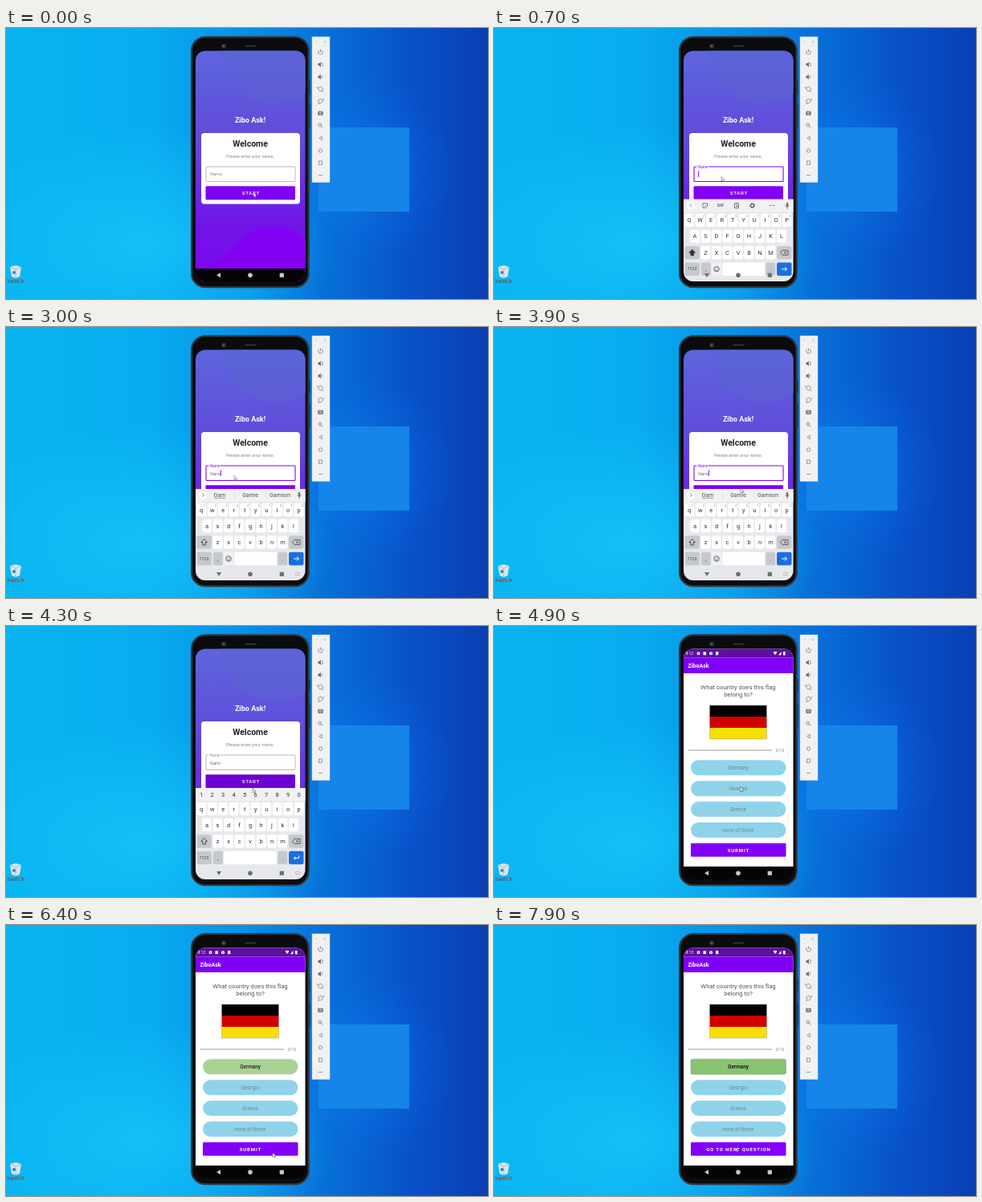
An HTML page for the animation above (8000 ms loop, 600x338 px).

```html
<!DOCTYPE html>
<html lang="en">
<head>
<meta charset="utf-8">
<title>Quiz on a phone emulator</title>
<style>
html, body { margin: 0; width: 100%; height: 100%; overflow: hidden; background: #0a7fe0; }
svg { display: block; width: 100vw; height: 100vh; font-family: Roboto, "Open Sans", sans-serif; }
</style>
</head>
<body>
<svg viewBox="0 0 600 338">
  <defs>
    <linearGradient id="sky" x2="1">
      <stop stop-color="#08b4f0"/><stop offset=".3" stop-color="#08acf0"/>
      <stop offset=".5" stop-color="#0890e6"/><stop offset=".66" stop-color="#0770d8"/>
      <stop offset=".85" stop-color="#0850c8"/><stop offset="1" stop-color="#0a3fb4"/>
    </linearGradient>
    <radialGradient id="beam">
      <stop stop-color="#14c2f8" stop-opacity=".9"/><stop offset="1" stop-color="#14c2f8" stop-opacity="0"/>
    </radialGradient>
    <radialGradient id="glow">
      <stop stop-color="#1080f0" stop-opacity=".7"/><stop offset="1" stop-color="#0a68e4" stop-opacity="0"/>
    </radialGradient>
    <linearGradient id="page" x2="0" y2="1">
      <stop stop-color="#5d66de"/><stop offset=".4" stop-color="#6149da"/>
      <stop offset=".75" stop-color="#7016e6"/><stop offset="1" stop-color="#8004f2"/>
    </linearGradient>
    <linearGradient id="disc" x2="0" y2="1">
      <stop offset=".4" stop-color="#5a66d8"/><stop offset="1" stop-color="#5e5cd6"/>
    </linearGradient>
    <clipPath id="screen"><rect x="236" y="28.500" width="136.500" height="287.500" rx="12"/></clipPath>
  </defs>
  <rect width="600" height="338" fill="url(#sky)"/>
  <ellipse cx="170" cy="270" rx="240" ry="150" fill="url(#beam)"/>
  <ellipse cx="430" cy="178" rx="130" ry="125" fill="url(#glow)"/>
  <rect x="389" y="124" width="113" height="105" fill="#1585ea"/>
  <g id="bin">
    <path d="M5 298L12 296 19 298 17 310 12 312 7 310Z" fill="#dce5ea"/>
    <path d="M5 298L12 301 19 298M12 301V312" fill="none" stroke="#9aabb5" stroke-width=".7"/>
    <circle cx="10" cy="305" r="2" fill="#3585c6"/>
    <text x="12" y="317" font-size="4.300" fill="#fff" stroke="#123" stroke-width=".7" paint-order="stroke" text-anchor="middle">Recycle Bin</text>
  </g>
  <g id="phone">
    <path d="M377.500 66V82M377.500 96V126" stroke="#333" stroke-width="2"/>
    <rect x="230" y="10.300" width="147.700" height="314" rx="18" fill="#2e2e32"/>
    <rect x="231.600" y="11.800" width="144.500" height="311" rx="16.500" fill="#0c0c0e" stroke="#56565c" stroke-width=".6"/>
    <circle cx="271" cy="22.500" r="3" fill="#292d35"/><circle cx="271" cy="22.500" r="1.200" fill="#526174"/>
    <path d="M298 22.500H311" stroke="#3a3a3e" stroke-width="1.600" stroke-linecap="round"/>
  </g>
  <g id="live" clip-path="url(#screen)"></g>
  <g id="tools" fill="none" stroke="#6c7276" stroke-width=".8">
    <rect x="381" y="11" width="22" height="181.500" fill="#f1f1f1" stroke="#d2d5d7" stroke-width=".5"/>
    <path d="M385.500 17H388M395.500 15.800L398 18.200M398 15.800L395.500 18.200" stroke="#aaa" stroke-width=".6"/>
    <path d="M389.500 28.200A2.800 2.800 0 1 0 393.500 28.200M391.500 26.500V30"/>
    <path d="M388.500 44H390L392 42.300V48.700L390 47H388.500ZM388.500 59.500H390L392 57.800V64.200L390 62.500H388.500Z" fill="#6c7276" stroke="none"/>
    <path d="M393.300 43Q395.300 45.500 393.300 48M393.300 59.500Q394.300 61 393.300 62.500"/>
    <path d="M388.300 76L391.500 72.800 394.700 76 391.500 79.200ZM388.300 91L391.500 87.800 394.700 91 391.500 94.200Z"/>
    <path d="M393 79H395.200M387.800 73V75M388 94.200H390.200M395.200 88V90"/>
    <rect x="388.700" y="104.200" width="5.600" height="4.200" rx=".5" fill="#6c7276"/><circle cx="391.500" cy="106.300" r="1.200" stroke="#fff" stroke-width=".7"/>
    <circle cx="390.800" cy="121" r="1.900"/><path d="M392.200 122.400L394.200 124.700"/>
    <path d="M393.300 135.200L389.700 137.500 393.300 139.800Z" stroke-width=".7"/>
    <circle cx="391.500" cy="153" r="2.200" stroke-width=".7"/>
    <rect x="389.400" y="166" width="4.200" height="4.200" stroke-width=".7"/>
    <path d="M389 183.500H394" stroke-width="1.200" stroke-dasharray="1.200 .7"/>
  </g>
  <path id="mouse" d="M0 0V5.600L1.400 4.500 2.300 6.500 3.300 6 2.400 4.100H4.100Z" fill="#fff" stroke="#444" stroke-width=".5"/>
</svg>
<script>
const LOOP = 8000, PURPLE = '#8000f7';
const $ = id => document.getElementById(id);
const clamp = x => Math.min(1, Math.max(0, x));
const part = (t, from, to) => clamp((t - from) / (to - from));
const easeOut = x => 1 - (1 - x) ** 3;
const smooth = x => x * x * (3 - 2 * x);

const box = (x, y, w, h, fill, r = 0, more = '') =>
  `<rect x="${x}" y="${y}" width="${w}" height="${h}" rx="${r}" fill="${fill}" ${more}/>`;
const line = (d, color, w = .8) => `<path d="${d}" fill="none" stroke="${color}" stroke-width="${w}"/>`;
const shape = (d, color) => `<path d="${d}" fill="${color}"/>`;
const dot = (x, y, r, fill, more = '') => `<circle cx="${x}" cy="${y}" r="${r}" fill="${fill}" ${more}/>`;
const text = (x, y, size, s, fill, weight = 400, anchor = 'middle', gap = 0) =>
  `<text x="${x + (anchor == 'middle' ? gap / 2 : 0)}" y="${y}" font-size="${size}" fill="${fill}" font-weight="${weight}" text-anchor="${anchor}" letter-spacing="${gap}">${s}</text>`;
const move = (y, s, opacity = 1) => `<g transform="translate(0 ${y})" opacity="${opacity}">${s}</g>`;

// Typed text and suggestions from each moment on
const typing = [
  [0, ''],
  [1600, 'G', 'G', 'Good', 'Great'],
  [1900, 'Ga', 'Ga', 'Game', 'Gave'],
  [2400, 'Gar', 'Gar', 'Garden', 'Garlic'],
  [2600, 'Garn', 'Garn', 'Garnie', 'Garnson']
];
const typedAt = t => typing.filter(s => s[0] <= t).pop();

const FOCUS = 520, CLICK = 4120, OPEN = 4470, PICK = 5750, SUBMIT = 6650, MINUTE = 7000;

function home(t) {
  const word = typedAt(t)[1];
  const focus = t >= FOCUS && t < CLICK;
  const lift = smooth(part(t, FOCUS, FOCUS + 150));
  const tint = focus ? PURPLE : '#8c8c8c';
  const labelSize = 5.6 - 1.1 * lift;
  const caretX = 254.7 + word.length * 3.15;
  let s = text(304, 118, 9, 'Zibo Ask!', '#fff', 700)
    + box(243, 131, 123, 88.5, '#fff', 4)
    + text(304, 148, 10.5, 'Welcome', '#222', 700)
    + text(304, 162, 5.6, 'Please enter your name.', '#888')
    + box(249, 173, 111, 18.5, 'none', 1, `stroke="${tint}" stroke-width="${focus ? 1.1 : .6}"`)
    + (lift > .5 ? box(252.5, 172, 14.5, 2, '#fff') : '')
    + text(254, 184 - 9.4 * lift, labelSize, 'Name', tint, 400, 'start')
    + text(254, 185, 6, word, '#666', 400, 'start');
  if (focus) s += line(`M${caretX} 178.500V186`, PURPLE, 1);
  s += box(248.5, 197.2, 111.5, 17, t >= CLICK ? '#6c00d2' : PURPLE, 1)
    + text(304.5, 208, 6.2, 'START', '#fff', 500, 'middle', .7);
  return box(236, 28, 137, 288, 'url(#page)')
    + dot(335, 28, 66, 'url(#disc)')
    + shape('M236 300C272 302 288 248 330 248C350 248 362 256 373 264V316H236Z', '#8300f3')
    + move(-12 * smooth(part(t, CLICK, CLICK + 130)), s);
}

const options = ['Germany', 'Georgia', 'Greece', 'none of these'];

function quiz(t) {
  const done = t >= SUBMIT;
  let s = box(236, 28, 137, 272, '#fff') + box(236, 28, 137, 11.5, '#5d0f9e') + box(236, 39.5, 137, 19.5, PURPLE)
    + text(238.5, 36, 5, t < MINUTE ? '8:12' : '8:13', '#fff', 400, 'start')
    + dot(254.5, 34.3, 1.4, 'none', 'stroke="#fff" stroke-width="1.200"')
    + box(260.5, 32.3, 3.5, 4, '#fff', .6) + dot(270, 34.3, 2, '#fff') + dot(270, 34.3, .7, '#5d0f9e')
    + box(276, 32, 3.3, 4.3, '#fff', .5)
    + shape('M347.500 32.500Q350 31 352.500 32.500L350 36.300ZM354 36.300H357.500V32Z', '#fff')
    + box(360, 32, 2.6, 4.4, '#fff', .4)
    + text(241.5, 51.7, 7, 'ZiboAsk', '#fff', 700, 'start')
    + text(304, 79, 7.7, 'What country does this flag', '#555')
    + text(304, 88, 7.7, 'belong to?', '#555')
    + ['#000', '#d00000', '#f7df0a'].map((c, i) => box(268.5, 99 + i * 14, 71, 14, c)).join('')
    + box(268.5, 99, 71, 42, 'none', 0, 'stroke="#999" stroke-width=".5"')
    + line('M242 155H346.500', '#bdbdbd', 1.5)
    + text(356, 157, 5, '0/10', '#888');
  options.forEach((name, i) => {
    const on = i == 0 && t >= PICK;
    const y = 167.3 + i * 25.9;
    s += box(245, y, 118.5, 19, on ? (done ? '#88c374' : '#aad194') : '#8fd3eb', on && done ? 2 : 9.5,
        on && done ? 'stroke="#75a964" stroke-width=".5"' : '')
      + text(304, y + 11.9, 6.4, name, on ? '#222' : '#78858b', on ? (done ? 700 : 500) : 400);
  });
  s += box(245, 271, 118.5, 16.8, PURPLE, 1)
    + text(304, 281.7, 6.1, done ? 'GO TO NEXT QUESTION' : 'SUBMIT', '#fff', 700, 'middle', .8);
  return s;
}

const key = (x, y, w, s, fill = '#fff', ink = '#333', size = 7.5) =>
  box(x - w / 2, y - 8.2, w, 16.4, fill, 2.3) + text(x, y + size * .35, size, s, ink);

function strip(t, word) {
  const ink = '#5f6368';
  if (t >= CLICK) return [...'1234567890'].map((c, i) => text(243 + i * 13.5, 212.8, 7.5, c, '#333')).join('');
  const mic = box(363.9, 206, 2.2, 5, ink, 1.1) + line('M362.800 209.500Q365 214 367.200 209.500M365 212V214', ink);
  const knob = dot(245, 209.7, 5, '#fff')
    + line(word[1] ? 'M244.200 207.500L246.400 209.700 244.200 211.900' : 'M246 207.500L243.800 209.700 246 211.900', ink);
  if (word[1]) {
    return knob + mic + [266, 304, 341].map((x, i) => text(x, 212.2, 6.9, word[i + 2], '#4a4e52')).join('')
      + line('M259 213.500H273', ink, .6) + line('M284.500 206V214M324 206V214', '#cdd0d3', .6);
  }
  return knob + mic
    + line('M260 207H265.500V210.500L263.500 212.500H260ZM262 210Q263 211 264 210', ink)
    + text(282, 211.800, 5.5, 'GIF', ink, 700)
    + box(299.5, 207, 5, 6, 'none', .6, `stroke="${ink}" stroke-width=".9"`)
    + line('M300.500 207H303.500M301 209.500H303.500M301 211H303.500', ink)
    + dot(321.5, 209.7, 2, 'none', `stroke="${ink}" stroke-width="1.200"`)
    + dot(321.5, 209.7, 3, 'none', `stroke="${ink}" stroke-width="1" stroke-dasharray="1.180 1.180"`)
    + [343.5, 346, 348.5].map(x => dot(x, 209.7, .7, ink)).join('');
}

function keyboard(t) {
  const word = typedAt(t), caps = !word[1], numbers = t >= CLICK;
  const dark = '#c5c9ce';
  const row = (chars, x, y) => [...chars].map((c, i) =>
    key(x + i * 13.5, y, 12, caps ? c.toUpperCase() : c)
    + (y < 230 && !numbers ? text(x + 4.2 + i * 13.5, 224, 3, (i + 1) % 10, '#777') : '')).join('');
  return box(236, 202, 137, 130, '#e6e8ec') + box(236, 202, 137, 16, '#eff1f3') + strip(t, word)
    + row('qwertyuiop', 243.2, 228) + row('asdfghjkl', 250, 248) + row('zxcvbnm', 263.5, 268.5)
    + key(246.7, 268.5, 18.5, '', dark)
    + `<path d="M246.700 264.500L250.500 268.500H248.500V272H244.900V268.500H242.900Z" fill="${caps ? '#333' : 'none'}" stroke="#333" stroke-width=".8"/>`
    + key(361.3, 268.5, 18.5, '', dark)
    + line('M356.500 268.500L359 265.500H366V271.500H359ZM361 267L364 270M364 267L361 270', '#444')
    + key(246.7, 289, 18.5, '?123', dark, '#444', 5.2) + key(263.8, 289, 12, ',', dark)
    + (numbers ? key(304, 289, 66, '') : key(277, 289, 12, '', '#eff1f3') + key(310.7, 289, 53, '')
      + dot(277, 289, 3.3, 'none', 'stroke="#444" stroke-width=".8"') + dot(275.8, 288, .5, '#444') + dot(278.2, 288, .5, '#444')
      + line('M275.200 289.800Q277 292 278.800 289.800', '#444', .7))
    + key(344.3, 289, 12, '.', dark) + key(361.3, 289, 18.5, '', '#1a6fe0')
    + line(numbers ? 'M364.500 286.500V289.500H358.500M360.500 287.500L358.500 289.500 360.500 291.500'
      : 'M358 289H364.500M362 286.500L364.500 289 362 291.500', '#fff', 1);
}

function nav(up, settled) {
  const c = up ? '#6b6f73' : '#c9c9c9';
  return shape(up ? 'M262 306H268L265 311Z' : 'M267 305.300V311.300L262 308.300Z', c)
    + dot(304, 308.3, 2.8, c) + box(340.7, 305.700, 5.200, 5.200, c)
    + (settled ? box(360.3, 306.5, 5, 3, 'none', .4, `stroke="#aaa" stroke-width=".7"`) : '');
}

const path = [
  [0, 308, 205], [100, 308, 205], [380, 283, 185.5], [1600, 283, 185.5], [2200, 284, 185.5], [3000, 284, 185.5],
  [3750, 307, 201], [4300, 307, 202], [4800, 307, 202], [5200, 303, 193], [5600, 301, 178], [5850, 302, 178],
  [6400, 332, 284], [6800, 332, 284], [7500, 302, 277], [8000, 300, 277]
];

function mouse(t) {
  const i = path.findIndex(p => p[0] > t), [a, b] = [path[i - 1], path[i]];
  const k = smooth(part(t, a[0], b[0]));
  return [1, 2].map(n => a[n] + (b[n] - a[n]) * k);
}

function frame(now) {
  const t = now % LOOP;
  const rise = easeOut(part(t, 560, 825)), fall = smooth(part(t, OPEN, OPEN + 230));
  const drop = 114 * (1 - rise + fall);
  const open = part(t, OPEN, OPEN + 260);
  $('live').innerHTML = (open < 1 ? home(t) : '')
    + (open > 0 ? move(24 * (1 - easeOut(open)), quiz(t), open) : '')
    + box(236, 300, 137, 16, '#050506')
    + (drop < 114 ? move(drop, keyboard(t)) : '')
    + nav(drop < 90, drop < 1);
  $('mouse').setAttribute('transform', `translate(${mouse(t)})`);
  requestAnimationFrame(frame);
}
requestAnimationFrame(frame);
</script>
</body>
</html>
```
